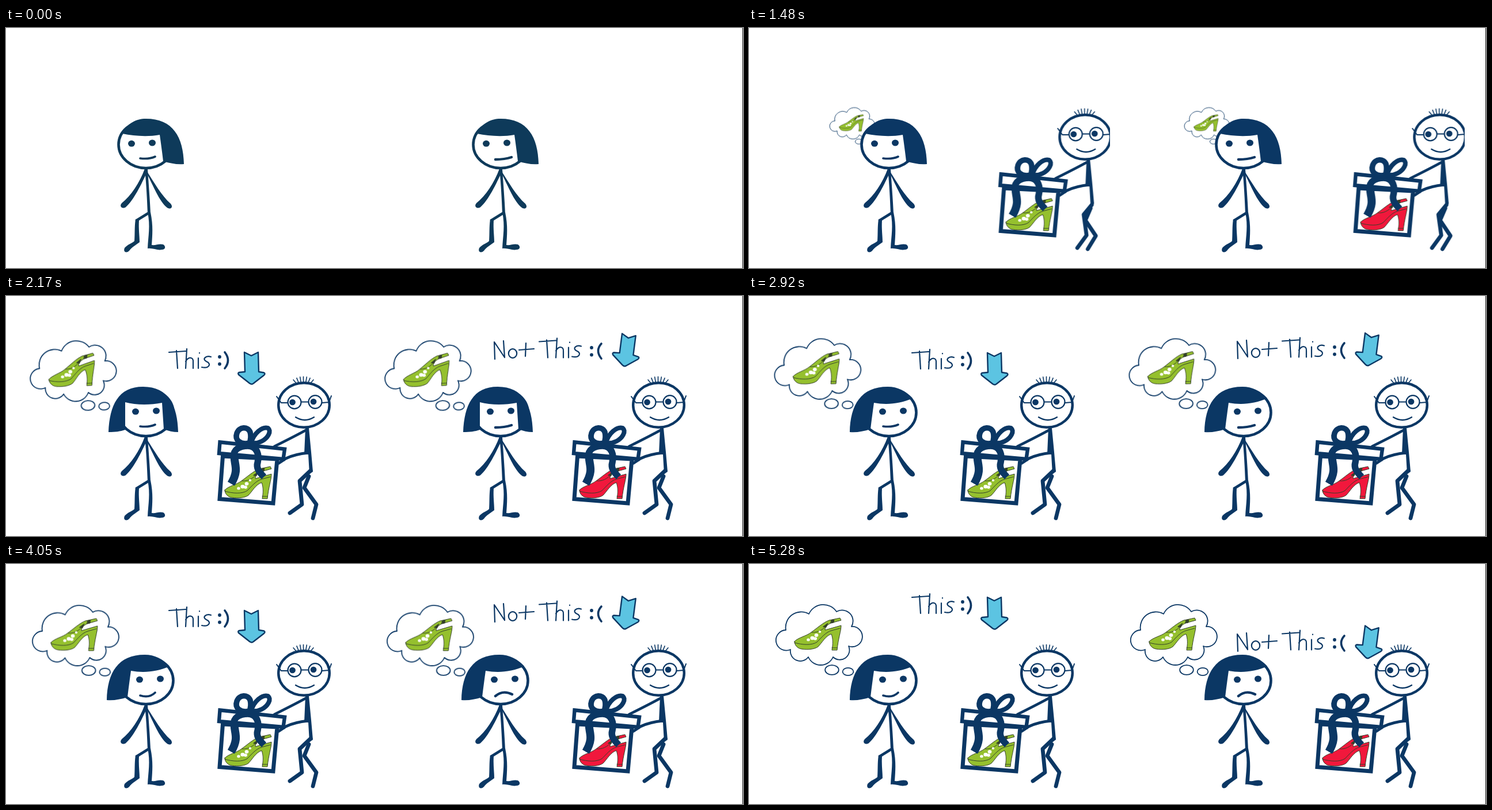
Recreate the animation shown at these times as an HTML page. Size 1280x418 px, loop 5480 ms.

```html
<!DOCTYPE html>
<html lang="en">
<head>
<meta charset="utf-8">
<title>This, not this</title>
<style>
  html, body { margin: 0; width: 100%; height: 100%; overflow: hidden; background: #fff; }
  svg { display: block; fill: none; stroke: currentColor; stroke-linecap: round; stroke-linejoin: round; }
  svg, .anim { animation: 5480ms linear infinite; }
  svg { animation-name: ink; }
  .solid { fill: currentColor; stroke: none; }
  .paper { fill: #fff; }
  .man { animation-name: enter; }
  .near { animation-name: near; }
  .far { animation-name: far; }
  .thought { animation-name: thought; transform-origin: 241px 212px; }
  .left { animation-name: faceLeft; }
  .front { animation-name: faceFront; }
  .right { animation-name: faceRight; }
  .eyes { animation-name: eyes; }
  .smile { animation-name: smile; }
  .frown { animation-name: frown; }
  .yes { animation-name: yes; }
  .no { animation-name: no; }
</style>
</head>
<body>
<script>
const LOOP = 5480;

// Stops are [milliseconds, declarations, easing to the next stop].
const keys = (name, ...stops) => `@keyframes ${name}{` + stops.map(([ms, css, ease = 'linear']) =>
  `${(ms / LOOP * 100).toFixed(4)}%{${css};animation-timing-function:${ease}}`).join('') + '}';
const hold = (name, ...stops) => keys(name, ...stops.map(([ms, css]) => [ms, css, 'step-end']),
  [LOOP, stops.at(-1)[1]]);
const slide = y => `opacity:1;transform:translateY(${y}px)`;
const tilt = (deg, size = 1) => `transform:rotate(${deg}deg) scale(${size})`;
const shape = d => `d:path("${d}")`;

const near = ['M529 304 L510 322 L514 363 L493 378', 'M529 308 L515 325 L520 361 L504 383'];
const far = ['M526 314 L518 334 L539 363 L533 387', 'M527 314 L518 335 L536 362 L522 385'];
const flat = { smile: 'M233 227 Q248 229 259 224', frown: 'M234 229 Q250 229 262 225' };
const felt = { smile: 'M233 229 Q249 234 259 224', frown: 'M234 230 Q247 219 263 227' };

const walk = (name, [a, b]) => keys(name,
  ...[0, 1000, 1160, 1320, 1480, 1640, LOOP].map((ms, i) => [ms, shape(i == 2 || i == 4 ? b : a)]));
const mood = name => keys(name, [0, shape(flat[name])], [3000, shape(flat[name])],
  [3400, shape(felt[name])], [LOOP, shape(felt[name])]);
const bob = (name, ...stops) => keys(name, [0, 'opacity:0'], [1900, 'opacity:0;transform:translateY(4px)'],
  ...stops.map(([ms, y]) => [ms, slide(y), 'ease-in-out']));

const style = document.createElement('style');
style.textContent = [
  hold('ink', [0, 'color:#0e3a5a'], [1000, 'color:#0b3764']),
  keys('enter', [0, 'transform:translateX(280px)', 'step-end'],
    [1000, 'transform:translateX(243px)', 'steps(11,end)'],
    [1660, 'transform:translateX(0)'], [LOOP, 'transform:translateX(0)']),
  walk('near', near),
  walk('far', far),
  keys('thought', [0, tilt(0, 0), 'step-end'], [1480, tilt(0, .52), 'step-end'],
    ...[[1540, -.6], [1750, 1.5], [2170, -3.6], [2400, -4.2], [2700, -3.6], [2920, -1.8], [3300, 1.5],
      [3500, 1.5], [4050, -.6], [4400, -2.4], [4700, -1.8], [5280, 0], [LOOP, 0]]
      .map(([ms, deg]) => [ms, tilt(deg)])),
  hold('faceLeft', [0, 'visibility:visible'], [2040, 'visibility:hidden']),
  hold('faceFront', [0, 'visibility:hidden'], [2040, 'visibility:visible'], [2320, 'visibility:hidden']),
  hold('faceRight', [0, 'visibility:hidden'], [2320, 'visibility:visible']),
  hold('eyes', [0, 'transform:translateX(0)'], [2040, 'transform:translateX(7px)'],
    [2320, 'transform:translateX(14px)']),
  mood('smile'),
  mood('frown'),
  bob('yes', [2100, 0], [2170, 0], [2500, 2], [2920, 1], [3400, 0], [4050, -17], [5180, -40], [LOOP, -40]),
  bob('no', [2100, 2], [2170, 0], [2500, -9], [2920, -1], [3350, 5], [3500, 4], [4050, -9],
    [4350, -19], [4650, -14], [5280, 42], [LOOP, 42]),
].join('\n');
document.head.append(style);

const line = (d, width, more = '') => `<path d="${d}" stroke-width="${width}" ${more}/>`;
const solid = d => `<path class="solid" d="${d}"/>`;
const oval = (cx, cy, rx, ry, more = 'class="solid"') =>
  `<ellipse cx="${cx}" cy="${cy}" rx="${rx}" ry="${ry}" ${more}/>`;
const at = (move, body) => `<g transform="${move}">${body}</g>`;
const anim = (name, body) => `<g class="anim ${name}">${body}</g>`;

const shoe = (fill, dots) => `<g fill="${fill}" stroke="#33402a" stroke-width="1">
  <path d="M0 42C6 35 20 33 29 26C40 18 50 9 60 5L79 1L81 5L63 10C57 13 53 17 53 22L81 14
    C81 24 76 36 74 57L65 57C67 46 67 37 64 29C54 32 48 44 41 51C36 55 24 57 12 55C5 54 0 48 0 42Z"/>
  <path fill="none" d="M0 44C14 48 30 49 39 43C47 35 54 26 64 23L79 19M30 26C40 27 48 22 54 16M65 53H74"/>
  <path fill="#33402a" d="M64 5L69 4L68 9L63 10ZM50 16L58 10L55 17Z"/></g>` +
  (dots ? [[31, 36, 3.6], [38, 31, 3.4], [24, 39, 2.8], [36, 37, 3], [44, 25, 2.2]]
    .map(([x, y, r]) => oval(x, y, r, r * .9, 'fill="#fff" stroke="none"')).join('') : '');
const greenShoe = shoe('#95c02e', true);
const redShoe = shoe('#f1183c', false);

const thought = anim('thought', line(`M64 115A27 27 0 0 1 104 87A27.6 27.6 0 0 1 152 83A19 19 0 0 1 178 109
  A17.6 17.6 0 1 1 173 143A16.8 16.8 0 0 1 146 162A23.5 23.5 0 0 1 103 162A17.3 17.3 0 0 1 72 149
  A17.8 17.8 0 1 1 64 115Z`, 1.8, 'class="paper"') +
  oval(144, 184.5, 11.8, 8.4, 'class="paper" stroke-width="1.8"') +
  oval(172, 187.5, 9.4, 6.6, 'class="paper" stroke-width="1.8"') +
  at('translate(79 93)', greenShoe));

const sideHair = (x, y) => solid(`M${x} ${y}C212 165 226 158 243 158C290 158 308 190 309 237
  C297 238 286 236 273 232C271 215 269 200 267 186C245 190 222 188 ${x} ${y}Z`);
const frontHair = solid(`M178 237C180 190 195 158 238 158C283 158 298 192 299 237C290 237 282 235 274 232
  L271 186C250 190 226 190 207 185L207 233C198 236 190 237 178 237Z`);

const girl = mouth =>
  oval(243, 203, 47.5, 41, 'class="paper" stroke-width="4.6"') +
  anim('left', sideHair(202, 184)) + anim('front', frontHair) +
  anim('right', at('matrix(-1 0 0 1 484 0)', sideHair(200, 178))) +
  anim('eyes', oval(218, 201.3, 6, 5.5) + oval(254, 200, 6, 5.5)) +
  line(flat[mouth], mouth == 'smile' ? 3.6 : 4.4, `class="anim ${mouth}"`) +
  solid('M241 245C232 270 217 292 201 305C196 311 202 316 208 312C222 300 235 272 246 249Z') +
  solid('M243 247C258 270 270 292 286 306C291 312 286 317 280 313C266 302 256 275 244 252Z') +
  solid('M241 245L246 246C248 275 250 300 251 323L246 323C245 300 244 275 241 245Z') +
  line('M248 322L227 335', 4.5) +
  solid(`M225 333L231 335C230 350 232 362 232 373C227 377 219 381 214 388C209 393 203 390 206 383
    C211 377 219 375 223 371C224 358 223 346 225 333Z`) +
  solid(`M246 321L251 321C256 345 254 362 253 378C260 379 266 375 273 377C278 380 277 386 271 386
    C263 388 256 383 246 384C247 362 251 345 246 321Z`);

const spikes = [-3, -2, -1, 0, 1, 2, 3].map(i =>
  `M${516.5 + i * 4.2} ${150 + i * i * .2}L${516.5 + i * 5.8} ${140.5 + i * i * .6}`).join('');

const gift = fill =>
  line('M376.5 279L371 353.5L464 361L471 284Z', 7, 'class="paper" style="stroke-linejoin:miter"') +
  at('translate(380 296)', fill) +
  line('M371.5 254.5L484 266.5L481.5 284L370 274Z', 6.4, 'class="paper" style="stroke-linejoin:miter"') +
  `<g style="stroke-linecap:butt">` +
  line('M397 274C394 292 407 300 391 327', 14) +
  line('M396 280C394 268 405 261 420 261C437 261 440 278 437 290C434 300 440 307 448 315', 11.5) +
  line('M423 256C406 260 397 250 401 239C405 227 420 227 424 237C426 244 425 250 423 256Z', 9.6) +
  line('M426 256C430 239 445 227 455 230C462 236 454 248 444 253C438 256 432 257 426 256Z', 8) + '</g>';

const man = fill => anim('man',
  line(near[0], 6.8, 'class="anim near"') + line(far[0], 6.8, 'class="anim far"') +
  solid('M520 230L526 230L530 272L533 306L527 310L525 276L518 275Z') +
  line('M522 233C506 242 488 251 466 262', 4.6) +
  line('M525 273C507 275 494 279 486 283L474 291', 5) +
  oval(517.5, 190, 44.3, 38.8, 'class="paper" stroke-width="4.4"') +
  line(spikes, 1.6) +
  oval(501, 185, 11.5, 11.3, 'stroke-width="2.2"') + oval(537, 184.5, 11.5, 11.3, 'stroke-width="2.2"') +
  line('M513 184.5H525M489 186H478L470 175M549 186L561 185L565 174', 2) +
  oval(497.5, 185, 5.4, 5.2) + oval(534, 184, 5.4, 5.2) +
  line('M503 211Q519 221 535 211', 2.3) + gift(fill));

const word = line(`M283 98L312 96M296 95L298 126M314 92L312 126M312 114C317 105 326 106 325 115L325 126
  M334 108L334 126M336 99V99.5M356 106C347 103 340 110 348 114C358 118 352 127 340 124`, 2.2);
const arrow = line(`M414 98L426 104L438 98L439 132L448 133.5Q451 135 448 138L430 152Q427 155 423 152
  L404 137Q402 134 405 133L415 132Z`, 2.4, 'fill="#5cc4e2"');
const colon = (x, y) => oval(x, y, 2.9, 2.9) + oval(x, y + 12.5, 2.9, 2.9);

const yes = `<g class="anim yes" role="img" aria-label="This :)">` + word + colon(371, 106) +
  line('M380 98Q391 112 380 126', 3.6) + arrow + '</g>';
const no = `<g class="anim no" role="img" aria-label="Not This :(">` +
  line('M233 110L232 80L250 107L248 78M287 82L286 105M275 94L301 92', 2.2) +
  oval(264, 100, 7.2, 7.8, 'stroke-width="2.2"') +
  at('translate(27 -18.5)', word) + colon(401, 90) + line('M418 83Q407 95 418 109', 3.6) +
  at('translate(35.5 -31) rotate(9 426.5 126)', arrow) + '</g>';

const panel = (x, mouth, fill, sign) => at(`translate(${x} 0)`,
  `<g clip-path="url(#pane)">${thought}${girl(mouth)}${man(fill)}${sign}</g>`);

document.body.innerHTML = `<svg width="1280" height="418" viewBox="0 0 1280 418">
  <clipPath id="pane"><rect width="626.5" height="418"/></clipPath>
  ${panel(0, 'smile', greenShoe, yes)}${panel(616, 'frown', redShoe, no)}
  <rect x="1279" width="1" height="418" fill="#222" stroke="none"/></svg>`;
</script>
</body>
</html>
```
